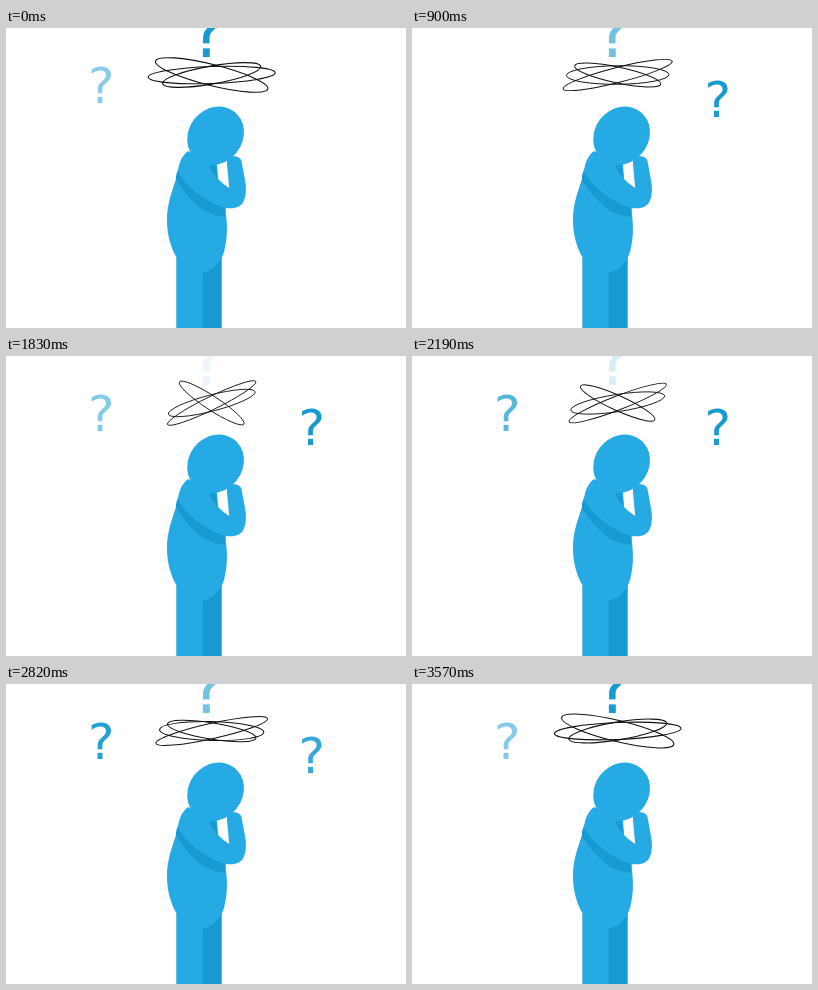
Animation, 400 px wide and 300 px high, one loop 3.6 s. Source, as an HTML page:

```html
<!DOCTYPE html>
<html lang="en">
<head>
<meta charset="utf-8">
<title>Confused thinker</title>
<style>
  html, body { margin: 0; width: 100%; height: 100%; overflow: hidden; background: #fff; }
  svg { display: block; width: 100%; height: 100%; }
  text { font-family: "DejaVu Sans", sans-serif; font-size: 50px; }
  .light { fill: #25aae3; }
  .dark, text { fill: #169ad1; }
  #swirl { fill: none; stroke: #111; stroke-width: 1.1; }
</style>
</head>
<body>
<svg viewBox="0 0 400 300">
  <text id="left" x="82" y="74.600">?</text>
  <text id="top" x="183.500" y="28.800" style="font-size:70px">?</text>
  <text id="right" x="292.500" y="88.700">?</text>
  <g id="swirl"></g>

  <path class="dark" d="M190 220H215.700V300H190Z"/>
  <path class="light" d="M170.300 215H196.500V300H170.300Z"/>
  <path class="light" d="M182 123C174 131 173 140 170 151C165 166 161 177 161 192C161 207 165 220 170.300 229L196 244.500C206 243 214 236 218 224C221.500 211 222 197 219 180L212 150L211 136Z"/>
  <path class="dark" d="M204 134L209 137Q212 144 211 152L204 145Z"/>
  <path class="dark" d="M172 142C169 149 169 152 174 158C188 177 201 188 219 188.500L220 177Z"/>
  <path class="light" d="M181 124C174 130 173 137 172 143C178 157 198 172 213 178C221 181.500 230 181 235 177C240 172 241 162 239 152L235.500 133C234 127 222 126 220.800 134L223.200 160Q218 157 212 151L204 140Z"/>
  <ellipse class="light" cx="209.600" cy="107.700" rx="27" ry="30.500" transform="rotate(38 209.600 107.700)"/>
</svg>
<script>
const LOOP = 3600;
const byId = id => document.getElementById(id);

// Rings: radii, starting angle and turn over half a loop.
const rings = [
  { rx: 63.5, ry: 8.5, angle: -2, turn: -24.4 },
  { rx: 57.9, ry: 10.5, angle: 14, turn: -29 },
  { rx: 49.8, ry: 9, angle: -10, turn: 44 }
];
for (const ring of rings) {
  ring.node = document.createElementNS("http://www.w3.org/2000/svg", "ellipse");
  ring.node.setAttribute("rx", ring.rx);
  ring.node.setAttribute("ry", ring.ry);
  byId("swirl").append(ring.node);
}

// Opacity keys as [time, value], linear in between.
const fades = {
  left: [[0, .5], [900, 0], [2700, 1], [LOOP, .5]],
  top: [[0, 1], [225, 1], [1950, 0], [3400, 1], [LOOP, 1]],
  right: [[0, 0], [900, 1], [2700, 1], [3540, 0], [LOOP, 0]]
};

function valueAt(keys, time) {
  const next = keys.findIndex(([at]) => at > time);
  const [t0, v0] = keys[next - 1], [t1, v1] = keys[next];
  return v0 + (v1 - v0) * (time - t0) / (t1 - t0);
}

function draw(time) {
  const swing = 1 - Math.abs(1 - time / (LOOP / 2));
  byId("swirl").setAttribute("transform", `translate(205.7 47) scale(${1 - .23 * swing})`);
  for (const { node, angle, turn } of rings) {
    node.setAttribute("transform", `rotate(${angle + turn * swing})`);
  }
  for (const id in fades) byId(id).style.opacity = valueAt(fades[id], time);
}

const start = performance.now();
function tick() {
  draw((performance.now() - start) % LOOP);
  requestAnimationFrame(tick);
}
tick();
</script>
</body>
</html>
```
